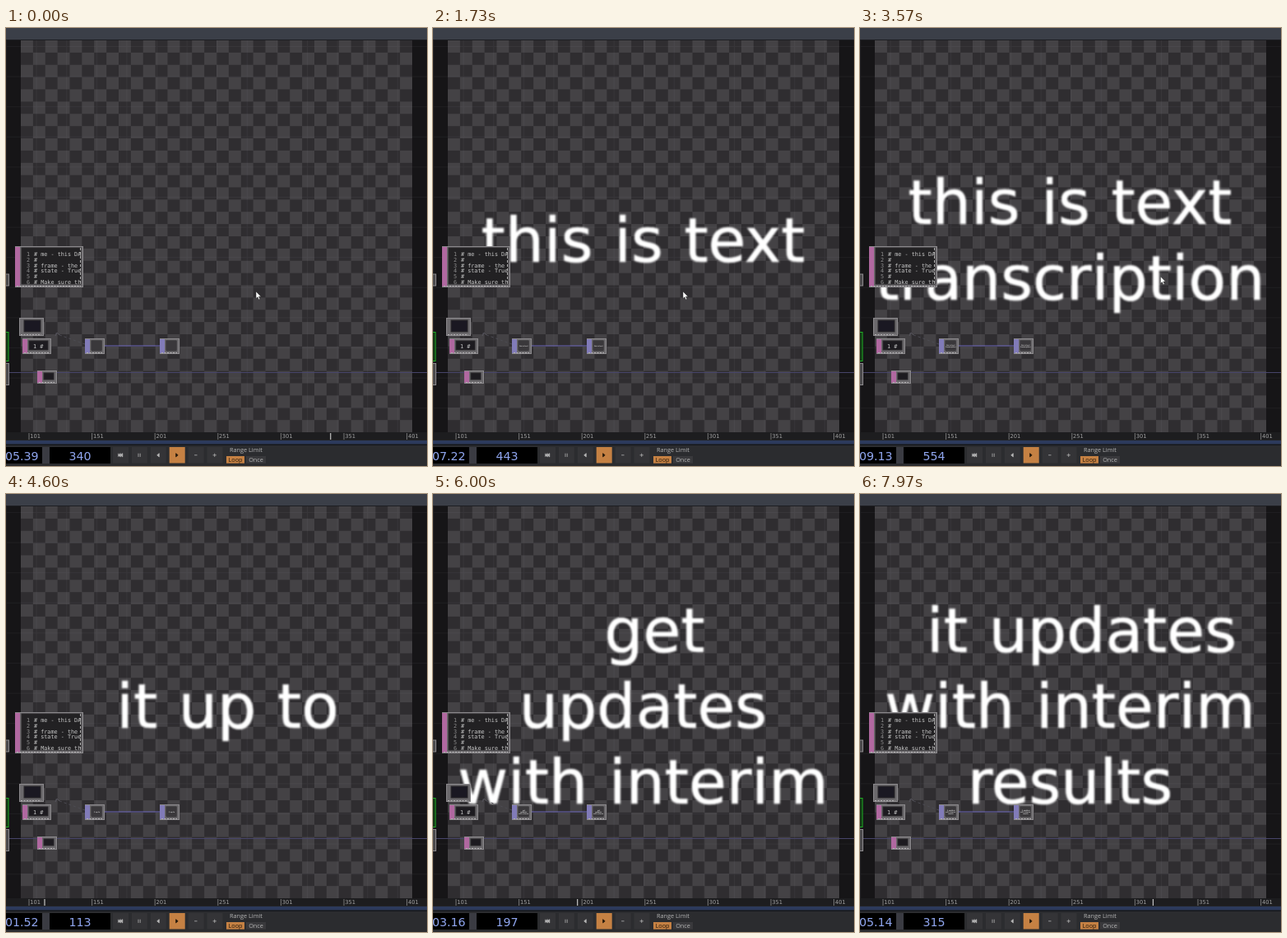
These frames come from a looping animation (512 px wide and 532 px high, 8000 ms). An HTML page:

```html
<!DOCTYPE html>
<html lang="en">
<head>
<meta charset="utf-8">
<title>Speech to text network</title>
<style>
  html, body { margin: 0; width: 100%; height: 100%; overflow: hidden; background: #161517; }
  svg { display: block; width: 512px; height: 532px; }
  text { white-space: pre; }
  .speech { font: 74.5px "DejaVu Sans", sans-serif; word-spacing: 2px; fill: #fff; stroke: #fff; stroke-width: .7; text-anchor: middle; }
  .code { font: 6.8px "DejaVu Sans Mono", monospace; fill: #c8c8c8; }
  .ruler { font: 6.7px "DejaVu Sans", sans-serif; fill: #a2a2a2; }
  .digits { font: 14.2px "DejaVu Sans", sans-serif; fill: #8fa5ee; }
  .label { font: 7.3px "Open Sans", sans-serif; fill: #b4b4b4; }
</style>
</head>
<body>
<svg id="stage" viewBox="0 0 512 532">
  <defs>
    <pattern id="checker" x="18" y="15" width="29.75" height="29.75" patternUnits="userSpaceOnUse">
      <rect width="29.75" height="29.75" fill="#444245"/>
      <path d="M14.875 0h14.875v14.875H0v14.875h14.875z" fill="#2f2d30"/>
    </pattern>
    <pattern id="grid" width="36.6" height="36.6" y="22" patternUnits="userSpaceOnUse">
      <path d="M0 .5H36.6M.5 0V36.6" stroke="#9a9aa8" stroke-opacity=".07"/>
    </pattern>
    <filter id="soft"><feGaussianBlur stdDeviation=".8"/></filter>
    <clipPath id="editor"><rect x="18" y="267" width="73" height="44"/></clipPath>
  </defs>
  <rect width="512" height="532" fill="#161517"/>
  <rect x="18" y="15" width="476" height="477" fill="url(#checker)"/>
  <rect y="15" width="512" height="477" fill="url(#grid)"/>
  <g filter="url(#soft)"><g id="speech" class="speech"></g></g>
  <g id="network"></g>
  <g id="panel"></g>
  <path id="cursor" d="M0 0v8.6l2-1.8 1.4 3.1 1.5-.6-1.4-3.1h2.7z" fill="#fff" stroke="#222" stroke-width=".5"/>
</svg>
<script>
const SVG = 'http://www.w3.org/2000/svg';
const $ = id => document.getElementById(id);
const network = $('network'), panel = $('panel'), speech = $('speech');

function add(parent, tag, attrs, content) {
  const el = document.createElementNS(SVG, tag);
  for (const key in attrs) el.setAttribute(key, attrs[key]);
  if (content !== undefined) el.textContent = content;
  return parent.appendChild(el);
}
const rect = (parent, x, y, width, height, fill, stroke = 'none') =>
  add(parent, 'rect', { x, y, width, height, fill, stroke });
const path = (parent, d, stroke, extra) =>
  add(parent, 'path', { d, stroke, fill: 'none', ...extra });
const label = (parent, cls, x, y, content, extra) =>
  add(parent, 'text', { class: cls, x, y, ...extra }, content);

function node(x, y, w, h, strip, inside = '#1d1b20', edge = 4) {
  rect(network, x, y, w, h, '#6b696c');
  rect(network, x + .5, y + .5, w - 1, h - 1, 'none', '#8b898c');
  const left = strip ? 8 : 6;
  if (strip) rect(network, x, y + 1, 6, h - 2, strip);
  rect(network, x + left, y + edge - 1, w - left - edge, h - 2 * edge, inside, '#2a292b');
  path(network, `M${x + 2} ${y + h - 1.5}H${x + w - 3}`, '#b4b2b4', { 'stroke-dasharray': '2 1.5' });
}

function drawNetwork() {
  const pink = '#b068a0', violet = '#817bb8';
  path(network, 'M0 418.5H512', '#47456a');
  path(network, 'M96 384L60 371', '#4c4b52', { 'stroke-dasharray': '3 3' });
  path(network, 'M60 374l2-4 3 3', '#55545c');
  path(network, 'M120 386H188', '#6a64b8');

  rect(network, -5, 299, 8.5, 14, '#4b4a4c', '#8b898c');
  rect(network, -5, 369.5, 8, 35, '#123414', '#1fae25');
  rect(network, -5, 407.5, 8.5, 26, '#4b4a4c', '#8b898c');

  node(11, 265, 83, 50, pink, '#222123', 3);
  const code = add(network, 'g', { 'clip-path': 'url(#editor)' });
  ['# me - this DAT', '#', '# frame - the c', '# state - True ', '#', '# Make sure the'].forEach((line, i) => {
    const y = 277 + i * 6.75;
    label(code, 'code', 25, y, i + 1, { style: 'fill:#8d8d8d' });
    label(code, 'code', 34, y, line);
  });
  path(network, 'M90.5 267V311', '#aaa', { 'stroke-dasharray': '3 2' });

  node(16, 352, 30, 22, null, '#1a1822');
  node(20, 377, 35, 19, pink);
  label(network, 'code', 33, 388.5, '1 #');
  node(38, 416, 24, 16, pink);
  for (const x of [96, 187]) {
    node(x, 377, 24, 19, violet);
    const thumb = add(network, 'g', { transform: `translate(${x + 7.5} 379.5) scale(.0265)` });
    add(thumb, 'rect', { x: 18, y: 15, width: 476, height: 477, fill: 'url(#checker)' });
    add(thumb, 'use', { href: '#speech' });
  }
}

const frameX = frame => 28 + (frame - 101) * 1.532;

function drawPanel() {
  rect(panel, 0, 0, 512, 14, '#3b3f48');
  rect(panel, 0, 14, 512, 1, '#1d1e22');
  rect(panel, 0, 491, 512, 10, '#1d1d1f');
  for (let f = 101; f <= 401; f += 50) {
    const x = frameX(f);
    path(panel, `M${x} 492V500`, '#777');
    label(panel, 'ruler', x + 1.3, 498.3, f);
  }
  rect(panel, 0, 500.5, 512, 31.5, '#2b2c2f');
  rect(panel, 0, 501, 512, 4.5, '#2c3a5c');
  rect(panel, 0, 505.5, 512, 1.5, '#17191e');
  rect(panel, -2, 509, 46, 20, '#000');
  rect(panel, 44, 509, 9, 20, '#3a3b42');
  rect(panel, 53, 509, 74, 20, '#000');

  const icons = [
    'M-3-2.5v5M3-2.5v5l-3-2.5zM0-2.5v5l-3-2.5z', 'M-1.3-2.5v5M1.3-2.5v5', 'M1.5-2.5v5l-3-2.5z',
    'M-1.5-2.5v5l3-2.5z', 'M-2 0h4', 'M-2.5 0h5M0-2.5v5'
  ];
  icons.forEach((d, i) => {
    const x = 130 + i * 22.9, active = i === 3;
    rect(panel, x, 509, 19, 19.5, active ? '#c58143' : '#343437');
    const color = active ? '#22160a' : '#b8b8b8';
    path(panel, d, color, { transform: `translate(${x + 9.2} 518.8) scale(.85)`, fill: color, 'stroke-width': .9 });
  });

  label(panel, 'label', 272, 515, 'Range Limit');
  rect(panel, 268, 520, 22, 8.7, '#c58143');
  rect(panel, 292, 520, 24, 8.7, '#39393c');
  label(panel, 'label', 279, 527.3, 'Loop', { 'text-anchor': 'middle', style: 'fill:#25180b' });
  label(panel, 'label', 304, 527.3, 'Once', { 'text-anchor': 'middle' });
}

drawNetwork();
drawPanel();
const timecode = label(panel, 'digits', 39.5, 524.5, '', { 'text-anchor': 'end' });
const counter = label(panel, 'digits', 90, 524.5, '', { 'text-anchor': 'middle' });
const playhead = rect(panel, 0, 492, 1.2, 8, '#c4c4c4');

const LOOP = 8000, CUT = 4250;
// Recognised text, one line per slash, with its start time; a leading space offsets the centring.
const phrases = [
  [0, ''],
  [300, 'this is'],
  [500, 'this is/Torbeln'],
  [1250, 'this is text'],
  [2100, 'this is text/transcription'],
  [CUT, ' it up to'],
  [4850, ' get/updates/with'],
  [5300, ' get/updates/with interest'],
  [5700, ' get/updates/with interim'],
  [6300, ' get/updates/with interim/results'],
  [7000, ' it updates/with interim/results']
];
const cursorPath = [[0, 304, 320], [3390, 304, 320], [3570, 365, 302], [3900, 505, 238], [CUT, 505, 238]];

let shown = null;
function showSpeech(phrase) {
  if (phrase === shown) return;
  shown = phrase;
  speech.replaceChildren();
  const lines = phrase.split('/');
  lines.forEach((line, i) => {
    const x = line.startsWith(' ') ? 269.5 : 255.5;
    label(speech, 'speech', x, 284 + (i - (lines.length - 1) / 2) * 92, line.trim());
  });
}

function moveCursor(t) {
  $('cursor').style.display = t < CUT ? '' : 'none';
  if (t >= CUT) return;
  const i = cursorPath.findIndex(step => step[0] > t);
  const [t0, x0, y0] = cursorPath[i - 1], [t1, x1, y1] = cursorPath[i];
  const k = (t - t0) / (t1 - t0);
  $('cursor').setAttribute('transform', `translate(${x0 + (x1 - x0) * k} ${y0 + (y1 - y0) * k})`);
}

function render(t) {
  const frame = Math.floor(t < CUT ? 340 + t * .06 : 113 + (t - 4600) * .06 + 1e-6);
  const pad = n => String(n).padStart(2, '0');
  counter.textContent = frame;
  timecode.textContent = pad(Math.floor((frame - 1) / 60)) + '.' + pad((frame - 1) % 60);
  playhead.setAttribute('x', frameX(frame));
  showSpeech(phrases.findLast(step => step[0] <= t)[1]);
  moveCursor(t);
}

const start = performance.now();
function tick() {
  render((performance.now() - start) % LOOP);
  requestAnimationFrame(tick);
}
tick();
</script>
</body>
</html>
```
